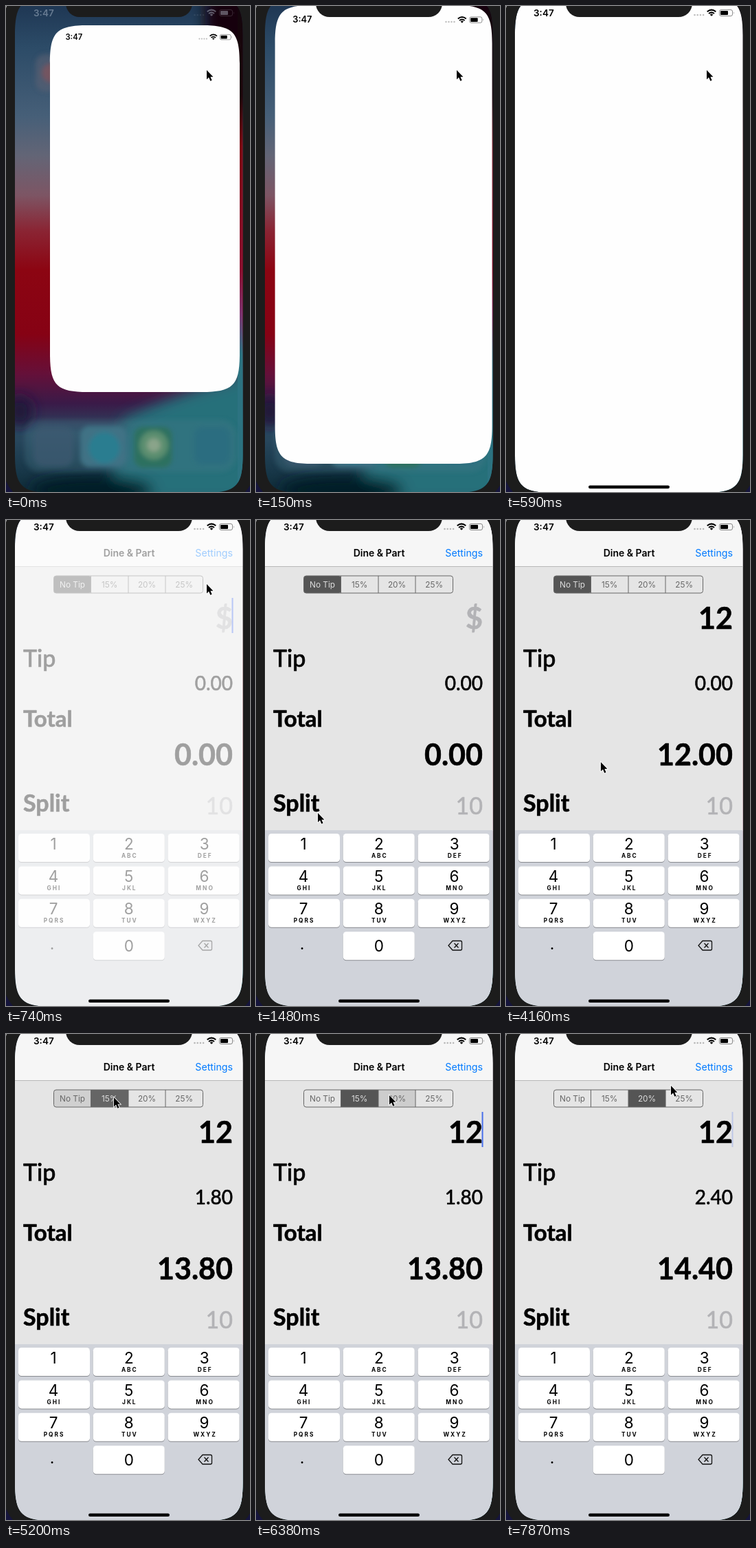
Write an HTML page that moves like this. It is 355 by 705 pixels and loops after 8000 ms.

```html
<!DOCTYPE html>
<html lang="en">
<head>
<meta charset="utf-8">
<title>Tip calculator</title>
<style>
  html, body { margin: 0; width: 355px; height: 705px; overflow: hidden; background: #1c1c1c; }
  svg { display: block; }
  text { font-family: Inter, sans-serif; white-space: pre; }
  .chalk text {
    font-family: Lato, sans-serif; fill: currentColor;
    stroke: currentColor; stroke-width: .6; stroke-linejoin: round;
  }
  .bold { font-weight: 700; }
  .mid { text-anchor: middle; }
  .end { text-anchor: end; }
</style>
</head>
<body>
<svg width="355" height="705" viewBox="0 0 355 705">
  <defs>
    <linearGradient id="desk" x2="0" y2="1">
      <stop stop-color="#aaa"/><stop offset=".1" stop-color="#333"/><stop offset="1" stop-color="#15143c"/>
    </linearGradient>
    <linearGradient id="sky" x2="0" y2="1">
      <stop stop-color="#1c3350"/><stop offset=".1" stop-color="#2c4b67"/>
      <stop offset=".24" stop-color="#465f78"/><stop offset=".32" stop-color="#636576"/>
      <stop offset=".4" stop-color="#7d5564"/><stop offset=".47" stop-color="#8a2534"/>
      <stop offset=".55" stop-color="#8c0512"/><stop offset=".68" stop-color="#860214"/>
      <stop offset=".76" stop-color="#651039"/><stop offset=".82" stop-color="#3a1a48"/>
      <stop offset=".88" stop-color="#2b4a61"/><stop offset="1" stop-color="#0d2c3a"/>
    </linearGradient>
    <linearGradient id="edge" x2="0" y2="1">
      <stop stop-color="#12060d"/><stop offset=".2" stop-color="#1c0408"/><stop offset=".3" stop-color="#7c0713"/>
      <stop offset=".55" stop-color="#8b1030"/><stop offset=".64" stop-color="#7c3471"/><stop offset=".72" stop-color="#2c7381"/>
    </linearGradient>
    <filter id="blur" x="-50%" y="-50%" width="200%" height="200%"><feGaussianBlur stdDeviation="10"/></filter>
    <filter id="soft" x="-50%" y="-50%" width="200%" height="200%"><feGaussianBlur stdDeviation="3"/></filter>
    <clipPath id="screen"><path id="glass"/></clipPath>
    <g id="status">
      <text x="40" y="14.5" font-size="13.5" font-weight="600" fill="currentColor">3:47</text>
      <g fill="currentColor" opacity=".25">
        <circle cx="274.5" cy="13" r="1.3"/><circle cx="278.7" cy="13" r="1.3"/>
        <circle cx="282.9" cy="13" r="1.3"/><circle cx="287.1" cy="13" r="1.3"/>
      </g>
      <g fill="none" stroke="currentColor" stroke-width="2">
        <path d="M292.7 8.3Q299 2.9 305.3 8.3M295 11Q299 7.7 303 11"/>
      </g>
      <path d="M296.7 12.4Q299 10.8 301.3 12.4L299 14.8Z" fill="currentColor"/>
      <rect x="310.5" y="5.5" width="19" height="9" rx="2.5" fill="none" stroke="currentColor" opacity=".45"/>
      <rect x="312" y="7" width="11" height="6" rx="1" fill="currentColor"/>
      <path d="M331 8.4q1.6 1.6 0 3.2z" fill="currentColor" opacity=".45"/>
    </g>
  </defs>

  <rect width="355" height="705" fill="url(#desk)"/>
  <rect x="-3" y="-28" width="364" height="748" rx="48" fill="#1c1c1c"/>

  <g clip-path="url(#screen)">
    <g id="home">
      <rect x="13" y="-13" width="332" height="719" fill="url(#sky)"/>
      <g filter="url(#blur)">
        <rect x="290" y="-30" width="80" height="180" fill="#12060d"/>
        <path d="M360 470L330 540Q240 565 170 600L150 720H360Z" fill="#28707a"/>
        <ellipse cx="20" cy="588" rx="18" ry="22" fill="#1f1838"/>
        <ellipse cx="125" cy="702" rx="90" ry="20" fill="#041c26"/>
      </g>
      <rect x="337" y="-13" width="8" height="719" fill="url(#edge)"/>
      <g filter="url(#soft)">
        <rect x="43" y="70" width="50" height="54" rx="14" fill="#5b6074" opacity=".6"/>
        <circle cx="66" cy="97" r="14" fill="#755560"/>
        <rect x="27" y="600" width="308" height="76" rx="22" fill="#4b7b8b" opacity=".3"/>
        <rect x="40" y="610" width="58" height="58" rx="14" fill="#3c5b72" opacity=".7"/>
        <rect x="108" y="609" width="68" height="60" rx="14" fill="#417285"/>
        <circle cx="143" cy="641" r="23" fill="#2b7d90"/>
        <rect x="186" y="610" width="56" height="60" rx="14" fill="#2f7158" opacity=".8"/>
        <circle cx="215" cy="637" r="21" fill="#5c8e70"/>
        <circle cx="215" cy="637" r="10" fill="#8aa48a"/>
        <rect x="273" y="610" width="54" height="56" rx="14" fill="#286c80" opacity=".6"/>
      </g>
      <use href="#status" color="#d7e2ee" opacity=".38"/>
    </g>

    <path id="card" fill="#fefefe"/>

    <g id="app">
      <rect x="13" y="67" width="332" height="384" fill="#e5e5e5"/>
      <rect x="13" y="-13" width="332" height="80" fill="#f6f6f6"/>
      <path d="M13 67.5H345" stroke="#b8b8b8"/>
      <text class="mid" x="179" y="53" font-size="14" font-weight="600">Dine &amp; Part</text>
      <text class="end" x="330" y="53" font-size="14.2" fill="#007aff">Settings</text>
      <g id="segments"></g>
      <rect x="69.5" y="81" width="217" height="25" rx="3.5" fill="none" stroke="#666"/>
      <path d="M123.5 81v25M178 81v25M232 81v25" stroke="#666"/>
      <g class="chalk">
        <text class="end bold" id="amount" x="330" y="158" font-size="43"></text>
        <text x="25" y="213" font-size="34" font-weight="500">Tip</text>
        <text class="end" id="tip" x="330" y="247" font-size="28"></text>
        <text class="bold" x="25" y="300" font-size="33">Total</text>
        <text class="end bold" id="total" x="330" y="356" font-size="43"></text>
        <text class="bold" x="25" y="423" font-size="34">Split</text>
        <text class="end" x="330" y="427" font-size="34" color="#b3b3b6">10</text>
      </g>
      <rect id="caret" x="328.5" y="113" width="2" height="51" fill="#426bea"/>
      <rect x="13" y="450" width="332" height="256" fill="#d0d3da"/>
      <g id="keys"></g>
      <text class="mid" x="67" y="623" font-size="23">.</text>
      <g fill="none" stroke="#111" stroke-width="1.3">
        <path d="M286 610.5H297.5Q299.5 610.5 299.5 612.5V622Q299.5 624 297.5 624H286L280 617.2Z"/>
        <path d="M288.5 614l6 6.5m0-6.5l-6 6.5"/>
      </g>
    </g>

    <use id="bar" href="#status" color="#000"/>
    <rect id="handle" x="120" y="695.5" width="118" height="4.6" rx="2.3"/>
  </g>
  <path d="M87 -4A20 20 0 0 0 107 16H251A20 20 0 0 0 271 -4Z" fill="#1c1c1c"/>
  <path id="cursor" d="M0 0V13.4L3.1 10.6L5.3 15.7L7.6 14.7L5.4 9.7H9.4Z" stroke="#fff" stroke-width="1.6" paint-order="stroke"/>
</svg>

<script>
const LOOP = 8000, STEP = 148.5, LAST_STEP = 53;
const $ = id => document.getElementById(id);

function add(parent, tag, attrs, label = '') {
  const el = document.createElementNS('http://www.w3.org/2000/svg', tag);
  for (const name in attrs) el.setAttribute(name, attrs[name]);
  el.textContent = label;
  return parent.appendChild(el);
}
function set(id, attrs) {
  for (const name in attrs) $(id).setAttribute(name, attrs[name]);
}

// Rectangle whose corners ease into the sides, as on a phone screen.
function squircle(x, y, w, h, r) {
  const e = 1.53 * r, c = .27 * r;
  return `M${x + e} ${y}h${w - 2 * e}c${e - c} 0 ${e} ${c} ${e} ${e}` +
    `v${h - 2 * e}c0 ${e - c} ${-c} ${e} ${-e} ${e}` +
    `h${2 * e - w}c${c - e} 0 ${-e} ${-c} ${-e} ${-e}` +
    `v${2 * e - h}c0 ${c - e} ${c} ${-e} ${e} ${-e}z`;
}

// Linear interpolation through [time, value, value...] points.
function track(t, points) {
  const next = points.findIndex(p => p[0] > t);
  if (next === 0) return points[0].slice(1);
  if (next < 0) return points.at(-1).slice(1);
  const a = points[next - 1], b = points[next], k = (t - a[0]) / (b[0] - a[0]);
  return a.slice(1).map((v, i) => v + (b[i + 1] - v) * k);
}

const segments = ['No Tip', '15%', '20%', '25%'].map((label, i) => {
  const x = 69.5 + i * 54.25;
  return {
    fill: add($('segments'), 'rect', { x, y: 81, width: 54.25, height: 25, rx: i % 3 ? 0 : 3.5, fill: '#555' }),
    text: add($('segments'), 'text', { class: 'mid', x: x + 27, y: 97.5, 'font-size': 11.8 }, label)
  };
});
const segmentFill = [
  [[5050, 1], [5200, .13], [5340, 0]],
  [[4950, 0], [5050, .16], [5200, .9], [5340, 1], [6385, 1], [6535, .13], [6680, 0]],
  [[6280, 0], [6385, .16], [6535, .9], [6680, 1]],
  [[0, 0]]
];

const letters = ['', 'ABC', 'DEF', 'GHI', 'JKL', 'MNO', 'PQRS', 'TUV', 'WXYZ'];
function makeKey(digit, col, row) {
  const x = 18 + col * 108.8, y = 455 + row * 47.4, center = 69 + col * 109.8;
  const box = { x, width: 104, height: 41, rx: 4.5 };
  add($('keys'), 'rect', { ...box, y: y + 1, fill: '#898b90' });
  const face = add($('keys'), 'rect', { ...box, y });
  add($('keys'), 'text', { class: 'mid', x: center, y: y + (digit ? 22.5 : 29), 'font-size': 22.5 }, digit);
  if (digit) add($('keys'), 'text', {
    class: 'mid bold', x: center + 1, y: y + 34.5, 'font-size': 8.3, 'letter-spacing': 2
  }, letters[digit - 1]);
  return face;
}
const keys = letters.map((_, i) => makeKey(i + 1, i % 3, Math.floor(i / 3)));
keys.push(makeKey(0, 1, 3));
keys.forEach(key => key.setAttribute('fill', '#fff'));

const cursorPath = [
  [1190, 292, 93], [1335, 210, 270], [1485, 90, 425], [1635, 80, 460], [1780, 77, 474],
  [1940, 77, 474], [2080, 84, 474], [2230, 100, 473], [2525, 106, 473], [2673, 132, 478],
  [2830, 132, 478], [2970, 137, 479], [3720, 137, 479], [3860, 136, 475], [4010, 136, 440],
  [4160, 138, 350], [4310, 144, 240], [4460, 151, 150], [4600, 155, 110], [4750, 157, 95],
  [4900, 157, 92], [5650, 157, 92], [5790, 164, 89], [5940, 184, 88], [6090, 194, 89],
  [7730, 194, 89], [7870, 240, 75]
];

function caretOpacity(t) {
  if (t > 2500 && t < 3700) return 1; // stays solid while typing
  const phase = (t + 1000 - (t < 2500 ? 520 : 220)) % 1000;
  return track(phase, [[0, 0], [170, 1], [500, 1], [700, 0]])[0];
}

function draw(t) {
  const [open] = track(t, [[0, 0], [150, .72], [300, .94], [445, .99], [594, 1]]);
  const mix = (from, to) => from + (to - from) * open;
  const x = mix(64, 13), y = mix(28, -13), scale = mix(276 / 332, 1);
  set('card', { d: squircle(x, y, mix(276, 332), mix(532, 719), 36) });
  set('bar', { transform: `translate(${x} ${mix(26, -13)}) scale(${scale}) translate(-13 13)` });
  set('handle', { opacity: track(t, [[300, 0], [590, 1]])[0] });
  set('app', { opacity: track(t, [[650, 0], [900, 1]])[0] });

  const amount = t < 2500 ? '' : t < 3220 ? '1' : '12';
  const tip = amount * (t < 5150 ? 0 : t < 6450 ? .15 : .2);
  $('amount').textContent = amount || '$';
  set('amount', { color: amount ? '#000' : '#b3b3b6' });
  $('tip').textContent = tip.toFixed(2);
  $('total').textContent = (+amount + tip).toFixed(2);
  set('caret', { opacity: caretOpacity(t) });

  segments.forEach(({ fill, text }, i) => {
    const [opacity] = track(t, segmentFill[i]);
    fill.setAttribute('opacity', opacity);
    text.setAttribute('fill', opacity > .5 ? '#dedede' : '#666');
  });
  keys[0].setAttribute('fill', t > 2500 && t < 2600 ? '#b7bbc3' : '#fff');
  keys[1].setAttribute('fill', t > 3220 && t < 3350 ? '#b7bbc3' : '#fff');
  set('cursor', { transform: `translate(${track(t, cursorPath).join(' ')})` });
}

function tick() {
  const step = Math.min(LAST_STEP, Math.floor((performance.now() % LOOP + 10) / STEP));
  draw(step * STEP);
  requestAnimationFrame(tick);
}
set('glass', { d: squircle(13, -13, 331.5, 719, 36) });
tick();
</script>
</body>
</html>
```
